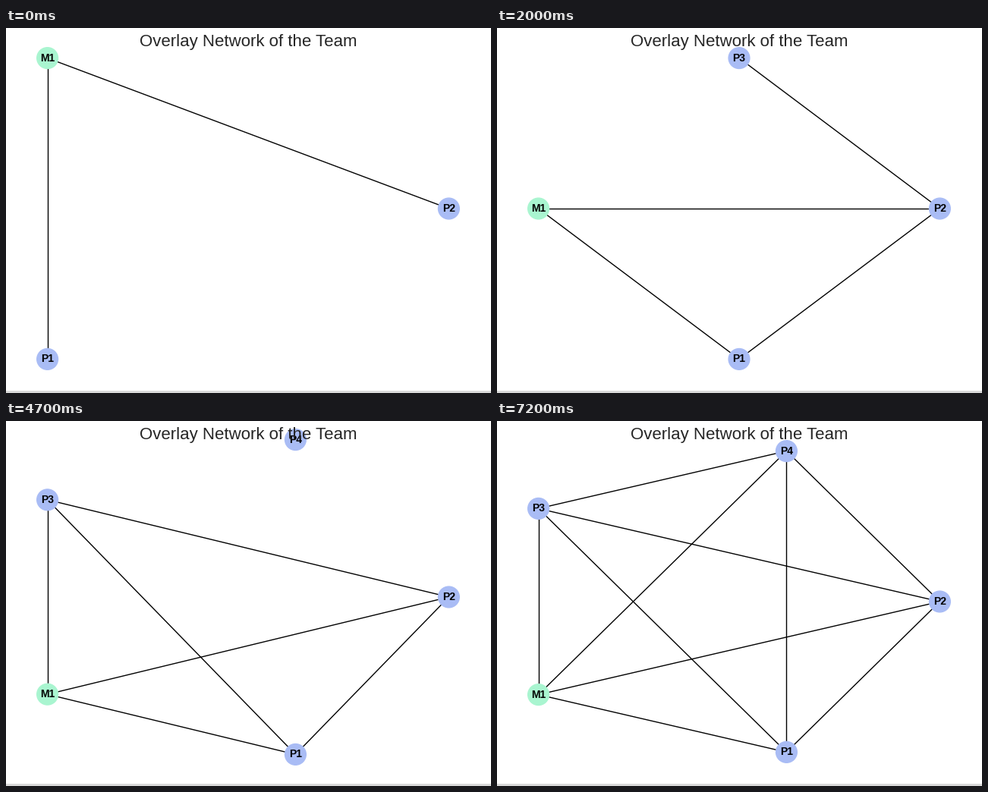
These frames come from a looping animation (639x481 px, 8000 ms). A matplotlib script:

```python
import numpy as np
import matplotlib.pyplot as plt
from matplotlib.animation import FuncAnimation
from matplotlib.collections import LineCollection
from matplotlib.patches import Rectangle

W, H, DPI = 639, 481, 100
STEP, LOOP = 100, 8000  # ms
GREEN, BLUE = "#A9F5D0", "#A9BCF5"
LEFT, RIGHT = 54.6, 583.4

plt.rcParams["font.family"] = "Liberation Sans"


def ring(names, mid, half):
    """Place nodes counterclockwise on a circle stretched to fill the stage."""
    angle = 2 * np.pi * np.arange(len(names)) / len(names)
    c, s = np.cos(angle), np.sin(angle)
    x = LEFT + (RIGHT - LEFT) * (c - c.min()) / (c.max() - c.min())
    y = mid - half * s / s.max()
    return dict(zip(names, zip(x, y)))


trio = ring(["P2", "M1", "P1"], 238, 198.4)
four = ["P2", "P3", "M1", "P1"]
five = ["P2", "P4", "P3", "M1", "P1"]
four_join, four_set = ring(four, 235, 210.4), ring(four, 238, 198.4)
five_join, five_set = ring(five, 232, 207.4), ring(five, 238, 198.4)

# start time, layout, links added at that time
EVENTS = [
    (0, trio, ["M1 P1", "M1 P2"]),
    (500, trio, ["P1 P2"]),
    (1100, four_join, []),
    (2000, four_set, ["P2 P3"]),
    (2900, four_set, ["P1 P3"]),
    (3700, four_set, ["M1 P3"]),
    (4700, five_join, []),
    (5100, five_set, ["P2 P4"]),
    (5800, five_set, ["P3 P4"]),
    (6700, five_set, ["M1 P4"]),
    (7200, five_set, ["P1 P4"]),
]

# the small surplus keeps float rounding from losing a pixel
fig = plt.figure(figsize=((W + 0.01) / DPI, (H + 0.01) / DPI), dpi=DPI,
                 facecolor="white")
ax = fig.add_axes([0, 0, 1, 1])
ax.set_xlim(0, W)
ax.set_ylim(H, 0)
ax.axis("off")

ax.add_patch(Rectangle((0, 478), W, 3, fc="#d9d9d9", lw=0))
edges = LineCollection([], colors="black", linewidths=1, zorder=1)
ax.add_collection(edges)
nodes = ax.scatter([], [], s=400, linewidths=1, zorder=2)
labels = {
    name: ax.text(0, 0, name, size=10, weight="bold", color="black",
                  ha="center", va="center", zorder=3)
    for name in ["M1", "P1", "P2", "P3", "P4"]
}
ax.text(319, 24, "Overlay Network of the Team", size=16, color="#262626",
        ha="center", va="baseline", zorder=4)


def draw(frame):
    past = [e for e in EVENTS if e[0] <= frame * STEP]
    pos = past[-1][1]
    links = [link.split() for _, _, added in past for link in added]
    edges.set_segments([[pos[a], pos[b]] for a, b in links])

    colors = [GREEN if name == "M1" else BLUE for name in pos]
    nodes.set_offsets(list(pos.values()))
    nodes.set_facecolor(colors)
    nodes.set_edgecolor(colors)

    for name, label in labels.items():
        label.set_visible(name in pos)
        if name in pos:
            label.set_position(pos[name])
    return [edges, nodes, *labels.values()]


anim = FuncAnimation(fig, draw, frames=LOOP // STEP, interval=STEP,
                     repeat=True, repeat_delay=0)
plt.show()
```
